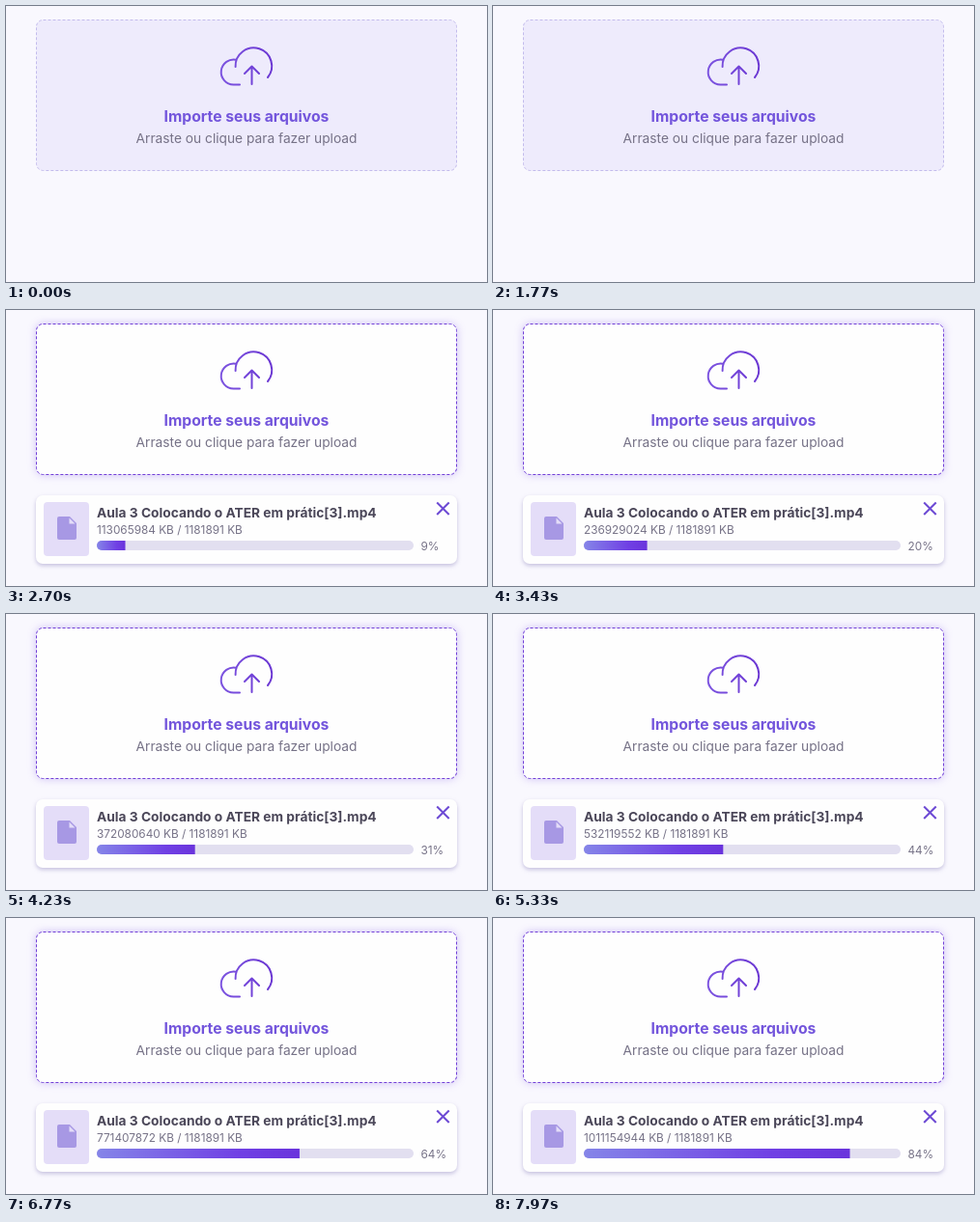
An HTML page that plays this animation: 498 px wide and 286 px high, repeating every 8000 ms.

```html
<!DOCTYPE html>
<html lang="pt">
<head>
<meta charset="utf-8">
<title>Upload</title>
<style>
  html, body { margin: 0; width: 100%; height: 100%; overflow: hidden; background: #f9f8fe; }
  svg { display: block; font-family: Inter, sans-serif; font-size: 13.76px; }
  .line { fill: none; stroke: url(#purple); stroke-width: 2; stroke-linecap: round; stroke-linejoin: round; }
  .strong { font-weight: 700; }
  .title { font-size: 15.73px; fill: #7355dc; }
  .muted { fill: #767287; }
  .small { font-size: 11.8px; }
  .zone { stroke-dasharray: 3 2; }
  #active { filter: drop-shadow(0 0 4px rgba(105, 60, 220, .3)); }
  #card > .panel { filter: drop-shadow(0 2px 2px rgba(80, 65, 150, .3)); }
</style>
</head>
<body>
<svg width="498" height="286" viewBox="0 0 498 286">
  <defs>
    <linearGradient id="purple" gradientUnits="userSpaceOnUse" x1="222" x2="276">
      <stop stop-color="#7d55e0"/><stop offset="1" stop-color="#6a36d2"/>
    </linearGradient>
    <linearGradient id="progress">
      <stop stop-color="#8585e8"/><stop offset=".7" stop-color="#7040e4"/><stop offset="1" stop-color="#6a34dc"/>
    </linearGradient>
    <clipPath id="track"><rect x="94" y="239" width="328" height="10" rx="5"/></clipPath>
  </defs>

  <rect class="zone" x="31.5" y="14.5" width="435" height="156" rx="7" fill="#eeebfc" stroke="#c3bbec"/>
  <rect class="zone" id="active" x="31.5" y="14.5" width="435" height="156" rx="7" fill="#fefefe" stroke="#7340d8"/>

  <path class="line" d="M237.6 63A18.8 18.8 0 1 1 271 74M238.5 55.8A13 13 0 1 0 235.5 81.5H242"/>
  <path class="line" d="M254.5 81V63M247 70L254.5 62.5L262 70"/>
  <text class="strong title" x="249" y="119.5" text-anchor="middle">Importe seus arquivos</text>
  <text class="muted" x="249" y="142" text-anchor="middle">Arraste ou clique para fazer upload</text>

  <g id="card">
    <rect class="panel" x="31" y="192" width="436" height="71" rx="7" fill="#fefefe"/>
    <rect x="39" y="199" width="47" height="56" rx="4" fill="#e4ddf8"/>
    <path fill="#a798e4" d="M55 214H66L73 221V236Q73 238 71 238H55Q53 238 53 236V216Q53 214 55 214Z"/>
    <path fill="#e4ddf8" d="M65.5 215.5V221.5H71.5Z"/>
    <path d="M446.2 199.5L458.7 212M458.7 199.5L446.2 212" stroke="#6d4ad4" stroke-width="2"/>
    <text class="strong" x="94" y="215" fill="#4b4759">Aula 3 Colocando o ATER em prátic[3].mp4</text>
    <text class="muted small" id="size" x="94" y="232"></text>
    <g clip-path="url(#track)">
      <rect x="94" y="239" width="328" height="10" fill="#e2dff0"/>
      <rect id="bar" x="94" y="239" height="10" fill="url(#progress)"/>
    </g>
    <text class="muted small" id="percent" x="429.5" y="249"></text>
  </g>
</svg>
<script>
  const LOOP = 8000, FPS = 30, DRAG_OVER = 60, FADE = 6, DROP = 71;
  const TOTAL_KB = 1181891, CHUNK = 16384;
  // [tick, bytes sent]; the display ticks FPS times a second
  const upload = [
    [DROP, 0], [81, 113065984], [127, 372080640],
    [160, 532119552], [203, 771407872], [239, 1011154944], [240, 1017200000]
  ];
  const el = id => document.getElementById(id);
  const [active, card, size, bar, percent] = ['active', 'card', 'size', 'bar', 'percent'].map(el);
  const clamp = v => Math.min(1, Math.max(0, v));

  function bytesAt(tick) {
    const next = upload.findIndex(([at]) => at > tick);
    if (next < 1) return 0;
    const [t0, b0] = upload[next - 1], [t1, b1] = upload[next];
    return Math.floor((b0 + (b1 - b0) * (tick - t0) / (t1 - t0)) / CHUNK) * CHUNK;
  }

  function draw(ms) {
    // the small lead absorbs timer rounding
    const tick = Math.min(LOOP / 1000 * FPS - 1, Math.floor((ms + 4) / 1000 * FPS));
    const bytes = bytesAt(tick);
    const done = Math.round(bytes / (TOTAL_KB * 1024) * 100);
    active.style.opacity = clamp((tick - DRAG_OVER) / FADE);
    card.style.display = tick < DROP ? 'none' : '';
    size.textContent = `${bytes} KB / ${TOTAL_KB} KB`;
    percent.textContent = `${done}%`;
    bar.setAttribute('width', 3.28 * done);
  }

  const start = performance.now();
  function loop() {
    draw((performance.now() - start) % LOOP);
    requestAnimationFrame(loop);
  }
  loop();
</script>
</body>
</html>
```
